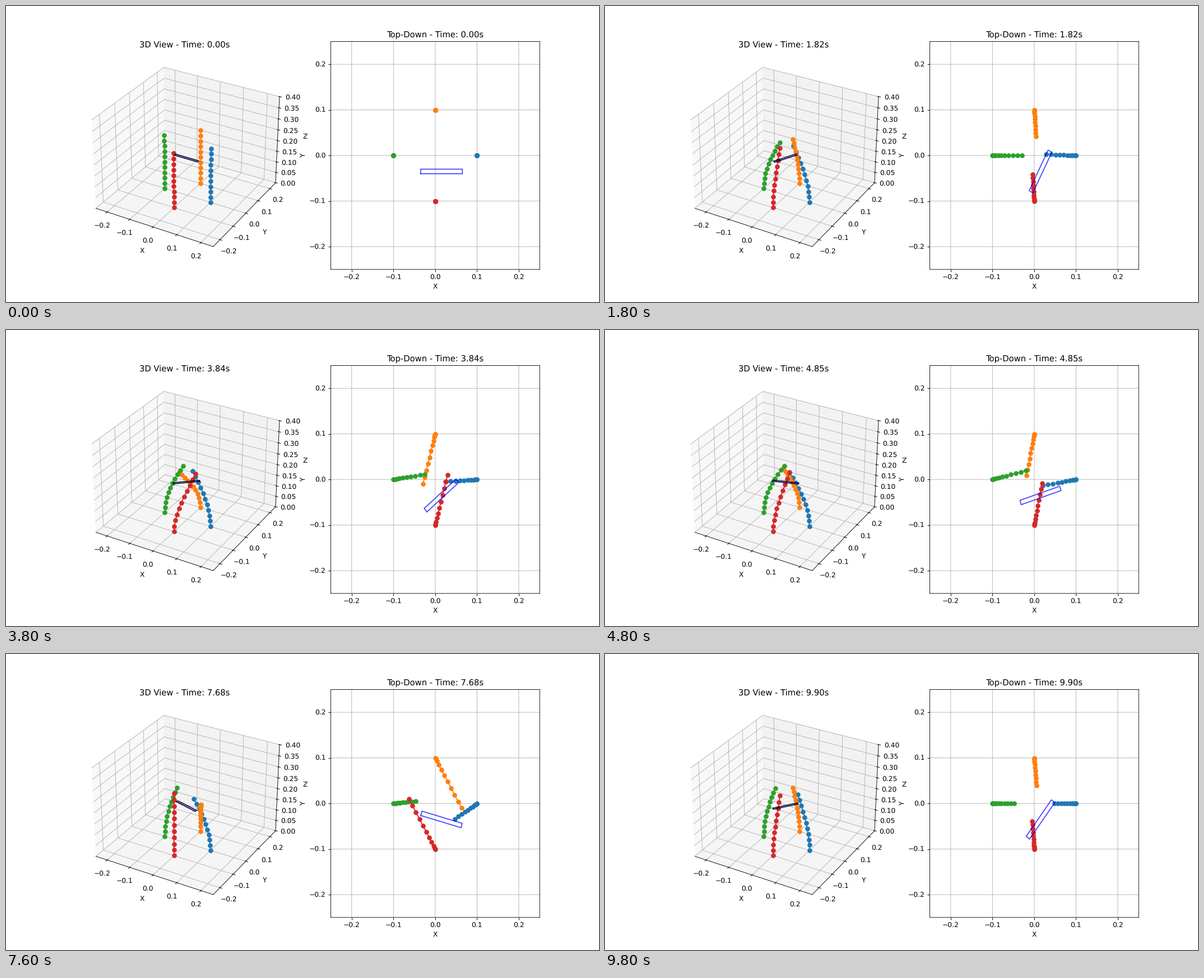
These frames come from a looping animation (1058x529 px, 9900 ms). A matplotlib script:

```python
import numpy as np
import matplotlib.pyplot as plt
from matplotlib.animation import FuncAnimation
from mpl_toolkits.mplot3d.art3d import Poly3DCollection

# Soft, unsnapped edges for text and thin lines.
plt.rcParams.update({"text.hinting": "none", "path.snap": False,
                     "axes.linewidth": 0.72, "grid.linewidth": 0.72})

FRAMES, INTERVAL = 99, 100
TIMES = np.linspace(0, 10, 100)
SEGMENTS, LENGTH = 10, 0.25
RING = 0.1
BLOCK_CENTER = np.array([0.015, -0.035])
BLOCK_SIZE = np.array([0.1, 0.01])
BLOCK_HEIGHT = 0.2

# Each pose: block angle (deg), then in mm the inward and sideways tip motion
# of the holding pair, its common sway, and the same motion of the turning pair.
POSES = {
    0: (0, 0, 0, 0, 0, 0),
    18: (63, 71, 1, 1.5, 58, -4),
    28: (62.3, 70.5, 0, 4, 128, 40),
    48: (18, 80, -16.5, 3, 91, 18.5),
    65: (65.2, 69, 0, 10, 108, 55.5),
    76: (-15.5, 53, -19.5, -14.5, 110, -63),
    98: (53, 52, 0, 0, 61, -5),
}
HOLD_BEND, TURN_BEND = 0.3, 0.345   # middle offset relative to the tip


def pose_at(frame):
    """Ease from one pose to the next."""
    keys = list(POSES)
    start = max(k for k in keys[:-1] if k <= frame)
    end = keys[keys.index(start) + 1]
    u = (frame - start) / (end - start)
    ease = u * u * (3 - 2 * u)
    a, b = np.array(POSES[start], float), np.array(POSES[end], float)
    return a + (b - a) * ease


def rod(base, tip, bend):
    """Clamped rod of fixed length whose tip moves sideways by `tip`."""
    s = np.linspace(0, 1, SEGMENTS + 1)
    profile = (8 * bend - 1) * s ** 2 + (2 - 8 * bend) * s ** 3
    flat = np.outer(profile, tip)
    step = np.hypot(*np.diff(flat, axis=0).T)
    rise = np.sqrt(np.maximum((LENGTH / SEGMENTS) ** 2 - step ** 2, 0))
    x, y = (flat + base).T
    return x, y, np.append(0, np.cumsum(rise))


def fingers(pose):
    _, hold_in, hold_side, sway, turn_in, turn_side = pose / 1000
    for i in range(4):
        out = np.array([(1, 0), (0, 1), (-1, 0), (0, -1)][i])
        side = np.array([-out[1], out[0]])
        if i % 2 == 0:
            tip = -hold_in * out + hold_side * side + (0, sway)
            yield rod(RING * out, tip, HOLD_BEND)
        else:
            yield rod(RING * out, -turn_in * out + turn_side * side, TURN_BEND)


def block_outline(degrees):
    c, s = np.cos(np.radians(degrees)), np.sin(np.radians(degrees))
    corners = np.array([(-1, -1), (1, -1), (1, 1), (-1, 1), (-1, -1)])
    x, y = (corners * BLOCK_SIZE / 2 @ [(c, s), (-s, c)] + BLOCK_CENTER).T
    return x, y


def block_face(x, y):
    return [np.column_stack([x, y, np.full(len(x), BLOCK_HEIGHT)])[:4]]


fig = plt.figure(figsize=(12, 6), dpi=88.1667)
view = fig.add_subplot(121, projection="3d")
top = fig.add_subplot(122)
for ax in (view, top):
    ax.set(xlim=(-0.25, 0.25), ylim=(-0.25, 0.25), xlabel="X", ylabel="Y")
view.set(zlim=(0, 0.4), zlabel="Z")
top.grid(True)

view_lines = [view.plot([], [], [], "o-")[0] for _ in range(4)]
top_lines = [top.plot([], [], "o-")[0] for _ in range(4)]
block = Poly3DCollection(block_face(*block_outline(0)), facecolors="blue",
                         edgecolors="black", linewidths=1, alpha=0.5)
view.add_collection3d(block)
outline, = top.plot([], [], "b-", alpha=0.7)


def update(frame):
    pose = pose_at(frame)
    for line, flat_line, (x, y, z) in zip(view_lines, top_lines, fingers(pose)):
        line.set_data_3d(x, y, z)
        flat_line.set_data(x, y)
    x, y = block_outline(pose[0])
    block.set_verts(block_face(x, y))
    outline.set_data(x, y)
    view.set_title(f"3D View - Time: {TIMES[frame]:.2f}s")
    top.set_title(f"Top-Down - Time: {TIMES[frame]:.2f}s")


animation = FuncAnimation(fig, update, frames=FRAMES, interval=INTERVAL,
                          init_func=lambda: update(0), repeat=True, repeat_delay=0)
plt.show()
```
